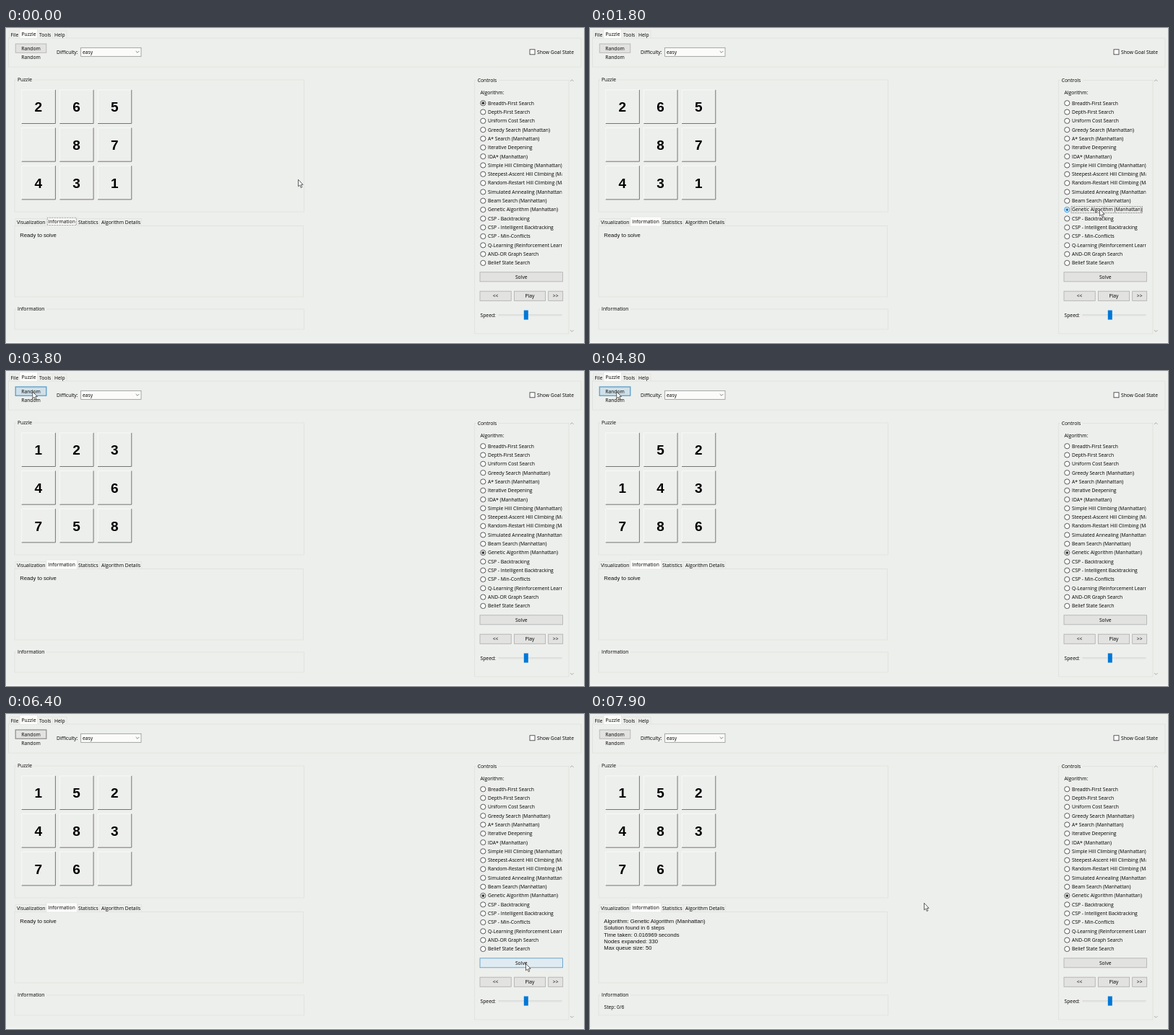
Write an HTML page that moves like this. It is 800x437 px and loops after 8000 ms.

```html
<!DOCTYPE html>
<html lang="en">
<head>
<meta charset="utf-8">
<title>Sliding puzzle solver</title>
<style>
  html, body { margin: 0; width: 100%; height: 100%; overflow: hidden; background: #edefec; }
  svg { display: block; width: 100vw; height: 100vh; }
  text { font: 6.75px "Open Sans", "Noto Sans", sans-serif; fill: #000; }
  .mono { font: 7.65px "Liberation Sans", Arial, sans-serif; fill: #111; }
  .digit { font: bold 19px "Liberation Sans", Arial, sans-serif; text-anchor: middle; }
  .mid { text-anchor: middle; }
</style>
</head>
<body>
<svg id="stage" viewBox="0 0 800 437"></svg>
<script>
const LOOP = 8000, STEP = 100;
const BG = '#edefec', LINE = '#dcdedb', BLUE = '#0078d7';
const stage = document.getElementById('stage');

function add(tag, attrs, parent = stage) {
  const el = document.createElementNS('http://www.w3.org/2000/svg', tag);
  set(el, attrs);
  parent.appendChild(el);
  return el;
}
function set(el, attrs) {
  for (const name in attrs) el.setAttribute(name, attrs[name]);
}
const show = (el, visible) => set(el, { visibility: visible ? 'visible' : 'hidden' });

// y is the vertical middle of the line of text
function label(text, x, y, cls = '', parent = stage) {
  const el = add('text', { x, y: y + 2.4, class: cls }, parent);
  el.textContent = text;
  return el;
}
function box(x1, y1, x2, y2, fill, stroke, width = 0.7) {
  return add('rect', { x: x1, y: y1, width: x2 - x1, height: y2 - y1, fill, stroke, 'stroke-width': width });
}
function path(d, stroke, width = 0.8, extra = {}) {
  return add('path', { d, fill: 'none', stroke, 'stroke-width': width, ...extra });
}
function focusBox(x1, y1, x2, y2) {
  const el = box(x1, y1, x2, y2, 'none', '#333', 0.6);
  set(el, { 'stroke-dasharray': '0.8 0.6' });
  return el;
}
function group(title, x1, y1, x2, y2, gap) {
  box(x1, y1, x2, y2, 'none', LINE);
  box(x1 + 3, y1 - 3, x1 + gap, y1 + 3, BG, 'none');
  label(title, x1 + 4, y1);
}
function button(text, x1, y1, x2, y2) {
  const area = [x1, y1, x2, y2];
  const face = box(...area, '#e2e3e1', '#adadad', 0.8);
  label(text, (x1 + x2) / 2, (y1 + y2) / 2, 'mid');
  return { area, face };
}
const inside = ([x1, y1, x2, y2], [x, y]) => x >= x1 && x <= x2 && y >= y1 && y <= y2;
function paintButton({ area, face }, pointer, focus) {
  const hover = inside(area, pointer);
  set(face, {
    fill: !hover ? '#e2e3e1' : focus ? '#cfe0e9' : '#e0ebf1',
    stroke: hover ? '#4f97c6' : focus ? '#8a8c8b' : '#adadad',
    'stroke-width': focus ? 1.2 : 0.8
  });
}

// Menu tabs and toolbar
box(0, 0, 800, 437, BG, 'none');
box(3.5, 14, 796, 54, 'none', LINE);
path('M4.5 14V4H19M43 4H84V14M64.5 4V14', LINE, 0.6);
box(19, 1.5, 43.5, 14.5, '#fcfdfb', LINE, 0.5);
label('File', 6.5, 9.3);
label('Puzzle', 21.5, 8.3);
label('Tools', 46, 9.3);
label('Help', 67, 9.3);
const randomButton = button('Random', 13.2, 22, 55.8, 34.2);
label('Random', 34.5, 41, 'mid');
label('Difficulty:', 70, 33.2);
box(103.7, 27.3, 187, 39.3, '#fbfcfa', '#858785');
label('easy', 106, 33.3);
path('M179.7 32L182 34.3L184.3 32', '#555', 0.7);
box(725, 29.8, 732, 36.8, '#fff', '#333', 0.8);
label('Show Goal State', 735, 33.3);

// Puzzle board
group('Puzzle', 12, 72, 412.5, 255, 26);
const tiles = Array.from({ length: 9 }, (_, i) => {
  const x = 21.7 + (i % 3) * 52.7, y = 85.8 + Math.floor(i / 3) * 52.7;
  path(`M${x} ${y + 47}V${y}H${x + 47}`, '#fafbf9', 0.9);
  path(`M${x + 46.7} ${y}V${y + 46.7}H${x}`, '#747674', 1);
  return add('text', { x: x + 23.2, y: y + 30.5, class: 'digit' });
});

// Result notebook
box(12, 274.5, 411.5, 373, 'none', LINE);
path('M13 274V264.5H187.5V274M129.5 264.5V274', LINE, 0.6);
box(56, 262, 98.5, 275, '#fcfdfb', LINE, 0.5);
label('Visualization', 15, 269.7);
label('Information', 58.3, 268.7);
label('Statistics', 100, 269.7);
label('Algorithm Details', 132, 269.7);
const tabFocus = focusBox(57.2, 263.3, 97.3, 273.5);
const resultLines = Array.from({ length: 5 }, (_, i) => label('', 19.3, 287.3 + i * 9.4, 'mono'));
group('Information', 12, 390, 412.5, 418, 44);
const stepText = label('Step: 0/6', 19.5, 407);

// Controls
group('Controls', 648.7, 72.5, 779, 424, 33);
label('Algorithm:', 656.5, 90);
add('rect', { x: 650, y: 95, width: 119.6, height: 240 },
  add('clipPath', { id: 'listClip' }));
const list = add('g', { 'clip-path': 'url(#listClip)' });
const CHOSEN = 12;
const radios = [
  'Breadth-First Search', 'Depth-First Search', 'Uniform Cost Search',
  'Greedy Search (Manhattan)', 'A* Search (Manhattan)', 'Iterative Deepening',
  'IDA* (Manhattan)', 'Simple Hill Climbing (Manhattan)',
  'Steepest-Ascent Hill Climbing (Manhattan)', 'Random-Restart Hill Climbing (Manhattan)',
  'Simulated Annealing (Manhattan)', 'Beam Search (Manhattan)',
  'Genetic Algorithm (Manhattan)', 'CSP - Backtracking', 'CSP - Intelligent Backtracking',
  'CSP - Min-Conflicts', 'Q-Learning (Reinforcement Learning)', 'AND-OR Graph Search',
  'Belief State Search'
].map((name, i) => {
  const cy = 104.2 + i * 12.32;
  const ring = add('circle', { cx: 660.3, cy, r: 3.6, fill: '#fff', 'stroke-width': 0.8 }, list);
  const dot = add('circle', { cx: 660.3, cy, r: 1.9 }, list);
  const text = label(name, 667, cy, '', list);
  return { ring, dot, area: [656, cy - 6, 667 + Math.min(103, text.getComputedTextLength()), cy + 6] };
});
const radioFocus = focusBox(666, 247.7, 764.5, 256.5);
const solveButton = button('Solve', 656, 338.8, 770.5, 351.8);
button('<<', 656, 365.2, 699.2, 378.3);
button('Play', 703.4, 365.2, 746.6, 378.3);
button('>>', 750.7, 365.2, 770.7, 378.3);
label('Speed:', 656.5, 398.3);
box(682, 397.5, 769, 399, '#e4e6e4', '#d2d4d2', 0.5);
box(716.8, 391.6, 722.8, 404.6, BLUE, 'none');
path('M781 74L783.3 71.7L785.6 74M781 419L783.3 421.3L785.6 419', '#9a9c9a', 0.8);
path('M0 436.3H800', '#fafbf9', 1.2);

const cursor = path('M0 0V9.5L2.2 7.6L3.7 11.2L5.3 10.5L3.8 7H6.6Z', '#222', 0.7, { fill: '#fff' });

// Pointer stops: time, x, y
const route = [
  [300, 404.5, 210.3], [1300, 705.5, 251.3], [1900, 705.5, 251.3], [2700, 160.7, 64.7],
  [3100, 36.8, 28.6], [5400, 36.8, 28.6], [6300, 719.5, 346.3], [6800, 719.5, 346.3],
  [7600, 462.5, 262.3]
];
function pointerAt(t) {
  const next = route.findIndex(stop => stop[0] >= t);
  if (next === 0) return route[0].slice(1);
  if (next < 0) return route[route.length - 1].slice(1);
  const [t0, x0, y0] = route[next - 1], [t1, x1, y1] = route[next];
  const u = (t - t0) / (t1 - t0), k = u * u * (3 - 2 * u);
  return [x0 + (x1 - x0) * k, y0 + (y1 - y0) * k];
}

const PICK = 1500, SHUFFLE = 3400, SOLVE = 6500, SOLVED = 6700;
const boards = [
  [0, '265 87431'], [SHUFFLE, '1234 6758'], [4400, ' 52143786'], [5200, '15248376 ']
];
const results = [
  'Algorithm: Genetic Algorithm (Manhattan)', 'Solution found in 6 steps',
  'Time taken: 0.016969 seconds', 'Nodes expanded: 330', 'Max queue size: 50'
];

function render(t) {
  const pointer = pointerAt(t);
  set(cursor, { transform: `translate(${pointer})` });

  const board = boards.filter(b => b[0] <= t).pop()[1];
  tiles.forEach((tile, i) => { tile.textContent = board[i].trim(); });

  const chosen = t < PICK ? 0 : CHOSEN;
  radios.forEach(({ ring, dot, area }, i) => {
    const color = inside(area, pointer) ? BLUE : '#333';
    set(ring, { stroke: color });
    set(dot, { fill: color });
    show(dot, i === chosen);
  });

  show(tabFocus, t < PICK);
  show(radioFocus, t >= PICK && t < SHUFFLE);
  paintButton(randomButton, pointer, t >= SHUFFLE && t < SOLVE);
  paintButton(solveButton, pointer, t >= SOLVE && t < SOLVED);

  const solved = t >= SOLVED;
  resultLines.forEach((line, i) => {
    line.textContent = solved ? results[i] : i ? '' : 'Ready to solve';
  });
  show(stepText, solved);
}

const start = performance.now();
function tick() {
  const elapsed = (performance.now() - start) % LOOP;
  render(Math.floor(elapsed / STEP) * STEP);
  requestAnimationFrame(tick);
}
tick();
</script>
</body>
</html>
```
